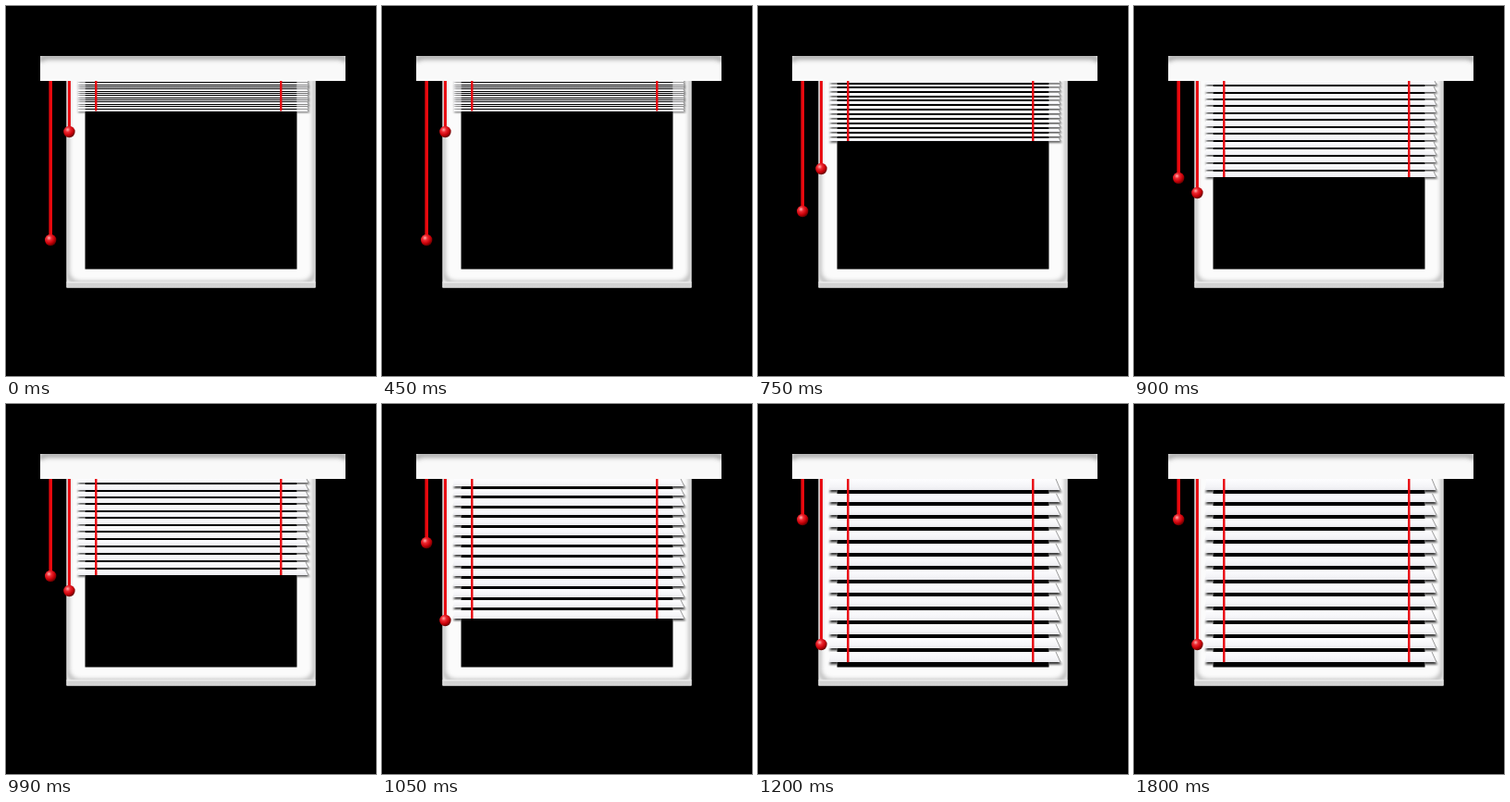
These frames come from a looping animation (400x400 px, 2.2 s). An HTML page:

```html
<!DOCTYPE html>
<html lang="en">
<head>
<meta charset="utf-8">
<title>Window blind</title>
<style>
  html, body { margin: 0; width: 100%; height: 100%; overflow: hidden; background: #000; }
  svg { display: block; width: 100%; height: 100%; }
</style>
</head>
<body>
<svg viewBox="0 0 400 400" xmlns="http://www.w3.org/2000/svg">
  <defs>
    <radialGradient id="bead" cx=".36" cy=".32" r=".68">
      <stop offset="0" stop-color="#ffb0b0"/>
      <stop offset=".32" stop-color="#ee2a32"/>
      <stop offset=".7" stop-color="#c80008"/>
      <stop offset="1" stop-color="#6c0000"/>
    </radialGradient>
    <linearGradient id="slat" x1="0" y1="0" x2="0" y2="1">
      <stop offset="0" stop-color="#fdfdff"/>
      <stop offset=".7" stop-color="#f4f4f7"/>
      <stop offset="1" stop-color="#e9e9ed"/>
    </linearGradient>
    <linearGradient id="sill" x1="0" y1="0" x2="0" y2="1">
      <stop offset="0" stop-color="#f0f0f0"/>
      <stop offset=".35" stop-color="#d2d2d2"/>
      <stop offset="1" stop-color="#d8d8d8"/>
    </linearGradient>
    <filter id="soft" filterUnits="userSpaceOnUse" x="20" y="40" width="360" height="290"><feGaussianBlur stdDeviation="2.6"/></filter>
    <filter id="shade" filterUnits="userSpaceOnUse" x="60" y="75" width="280" height="225"><feGaussianBlur stdDeviation="1.1"/></filter>
    <clipPath id="box"><path d="M37 54H367V81H37Z"/></clipPath>
    <clipPath id="below"><path d="M65.5 81H334.5V304.5H65.5Z"/></clipPath>
    <clipPath id="wood"><path id="wood-shape" clip-rule="evenodd" d="M65.5 81H334.5V304.5H65.5ZM85.5 81H314.5V284.5H85.5Z"/></clipPath>
  </defs>

  <rect width="400" height="400"/>

  <use href="#wood-shape" fill="#fbfbfb" fill-rule="evenodd"/>
  <g clip-path="url(#wood)">
    <path d="M66 76V288Q68 300 82 300H318Q332 300 334 288V76" fill="none" stroke="#aaa" stroke-width="4" filter="url(#soft)"/>
    <rect x="65" y="298" width="270" height="7" fill="url(#sill)"/>
    <path d="M66 81V304M334 81V304" stroke="#e4e4e4"/>
    <path id="shadow" fill="#111" fill-opacity=".85" filter="url(#shade)"/>
  </g>
  <g id="slats" clip-path="url(#below)"></g>

  <g clip-path="url(#box)">
    <rect x="37" y="54" width="330" height="27" fill="#f9f9f9"/>
    <path d="M37 60Q37 55 46 55H358Q367 55 367 60" fill="none" stroke="#999" stroke-width="5" filter="url(#soft)"/>
  </g>

  <g id="cords" fill="none" stroke="#e8080e"></g>
</svg>
<script>
const SLATS = 14, LOOP = 2200, TOP = 81;
// start time, first and last slat bottom, gap, left bead y, right bead y
const poses = [
  { at: 0,    first: 82.4, last: 113.5, gap: 1, left: 253, right: 136 },
  { at: 750,  first: 82.8, last: 146,   gap: 2, left: 222, right: 176 },
  { at: 900,  first: 85.4, last: 185,   gap: 2, left: 186, right: 202 },
  { at: 1050, first: 89,   last: 232,   gap: 3, left: 150, right: 234 },
  { at: 1200, first: 92.6, last: 279.2, gap: 4, left: 125, right: 260 }
];

const byId = id => document.getElementById(id);
function add(parent, tag, attrs) {
  const el = document.createElementNS("http://www.w3.org/2000/svg", tag);
  set(el, attrs);
  parent.appendChild(el);
  return el;
}
function set(el, attrs) {
  for (const k in attrs) el.setAttribute(k, attrs[k]);
}

const slats = Array.from({ length: SLATS }, () => ({
  body: add(byId("slats"), "path", { fill: "url(#slat)" }),
  edge: add(byId("slats"), "path", { fill: "none", stroke: "#808080", "stroke-width": .8 })
}));
const cord = (x, width) => ({ x, line: add(byId("cords"), "path", { "stroke-width": width }) });
const ladders = [cord(97.3, 2.4), cord(297.3, 2.4)];
const pulls = [cord(48.2, 3.6), cord(68.4, 3)];
for (const p of pulls) {
  p.bead = add(byId("cords"), "circle", { cx: p.x, r: 6.2, fill: "url(#bead)", stroke: "none" });
}

const hang = (c, y) => set(c.line, { d: `M${c.x} ${TOP}V${y}` });

// Slats hang a little closer together near the top than near the bottom.
function slatBottom(pose, i) {
  const n = SLATS - 1, pitch = (pose.last - pose.first) / n;
  return Math.round(pose.first + pitch * (i - .23 * Math.sin(Math.PI * i / n)));
}

function draw(time) {
  const t = time % LOOP;
  const pose = poses.filter(p => p.at <= t).pop();
  let top = TOP, shade = "";
  slats.forEach((s, i) => {
    const bottom = slatBottom(pose, i), height = bottom - top;
    const slant = Math.min(5, height * .5), right = 327 - slant;
    set(s.body, { d: `M78 ${top}H${right}L327 ${bottom}H77Z` });
    set(s.edge, { d: `M${right} ${top}L327 ${bottom}` });
    const low = bottom + pose.gap * .5 + .5;
    shade += `M80 ${bottom - height * .3}H${right + 1}L328.5 ${low}H77Z`;
    top = bottom + pose.gap;
  });
  set(byId("shadow"), { d: shade });
  ladders.forEach(c => hang(c, pose.last));
  [pose.left, pose.right].forEach((y, i) => {
    hang(pulls[i], y);
    set(pulls[i].bead, { cy: y });
  });
}

let start;
function tick(now) {
  start ??= now;
  draw(now - start);
  requestAnimationFrame(tick);
}
draw(0);
requestAnimationFrame(tick);
</script>
</body>
</html>
```
